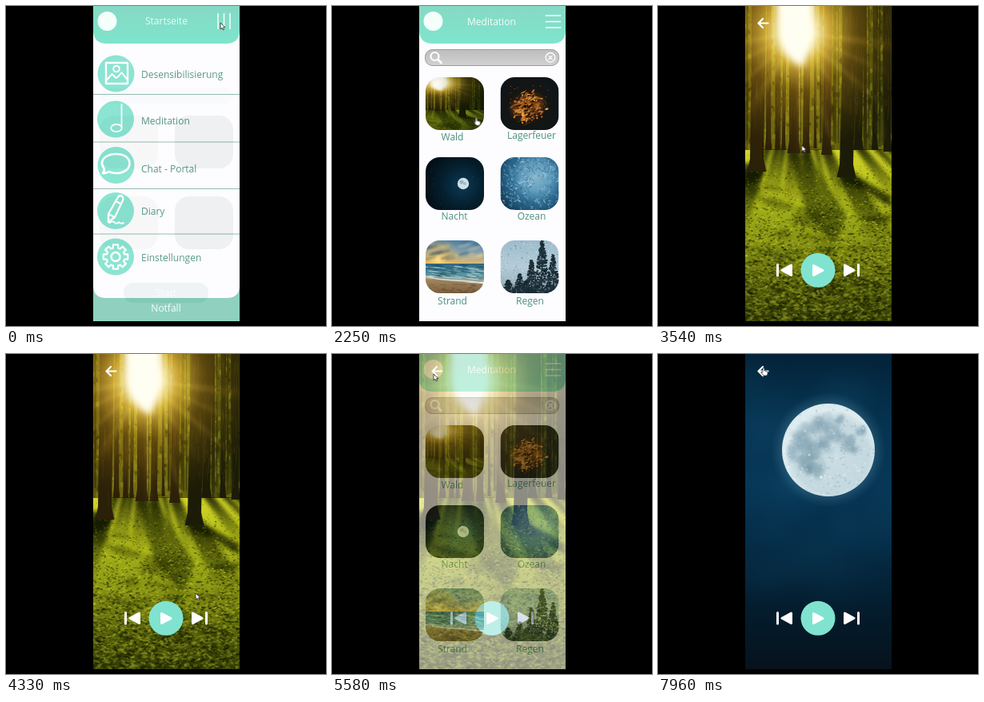
Write an HTML page with a canvas that moves like this. It is 400 by 400 pixels and loops after 8 s.

```html
<!DOCTYPE html>
<html lang="de">
<head>
<meta charset="utf-8">
<title>App-Prototyp</title>
<style>
html, body { margin: 0; width: 100%; height: 100%; overflow: hidden; background: #000; }
#stage { position: relative; width: 400px; height: 400px; overflow: hidden; background: #000; }
.screen { position: absolute; left: 109px; top: 0; width: 183px; height: 394px; overflow: hidden; }
.screen > * { position: absolute; left: 0; top: 0; }
svg { display: block; }
text { font: 12px "Open Sans", "Noto Sans", sans-serif; fill: #4c9080; }
.head { fill: #f2fffb; }
.mid { text-anchor: middle; }
.line { fill: none; stroke: #fff; stroke-linecap: round; stroke-linejoin: round; }
.screen, #cursor, #cursor g { animation: 8s linear infinite; }
#menu { animation: none; }
#start { animation-name: start; }
#paper { background: #fdfcfe; animation-name: paper; }
#list { animation-name: list; }
#forest { animation-name: forest; }
#moon, #controls { animation-name: moon; }
#cursor { position: absolute; left: 0; top: 0; animation-name: move; animation-timing-function: ease-in-out; }
#cursor .arrow { animation-name: arrow; animation-timing-function: step-end; }
#cursor .hand { animation-name: hand; animation-timing-function: step-end; }
@keyframes start { 0% { opacity: .08 } 1%, 100% { opacity: 0 } }
@keyframes paper { 0%, 23.125% { opacity: 0 } 27.5%, 100% { opacity: 1 } }
@keyframes list { 0%, 23.125% { opacity: 0 } 27.5%, 83.375% { opacity: 1 } 87.5%, 100% { opacity: 0 } }
@keyframes forest { 0%, 38.75% { opacity: 0 } 43.125%, 67.5% { opacity: 1 } 72%, 100% { opacity: 0 } }
@keyframes moon { 0%, 83.375% { opacity: 0 } 87.5%, 100% { opacity: 1 } }
@keyframes move {
  0%, 2% { transform: translate(268px, 21px) }
  14.5%, 15.5% { transform: translate(195px, 213px) }
  20%, 24% { transform: translate(200px, 143px) }
  32%, 40% { transform: translate(163px, 138px) }
  53%, 55% { transform: translate(237px, 299px) }
  65%, 70.5% { transform: translate(127px, 25px) }
  80%, 87.5% { transform: translate(154px, 228px) }
  97%, 100% { transform: translate(132px, 18px) }
}
@keyframes arrow { 0% { opacity: 1 } 19% { opacity: 0 } 42% { opacity: 1 } 64% { opacity: 0 } 68.5% { opacity: 1 } 79.5% { opacity: 0 } 83.5% { opacity: 1 } 96.5%, 100% { opacity: 0 } }
@keyframes hand { 0% { opacity: 0 } 19% { opacity: 1 } 42% { opacity: 0 } 64% { opacity: 1 } 68.5% { opacity: 0 } 79.5% { opacity: 1 } 83.5% { opacity: 0 } 96.5%, 100% { opacity: 1 } }
</style>
</head>
<body>
<div id="stage">
  <svg width="0" height="0" style="position:absolute">
    <defs>
      <linearGradient id="mint" x2="0" y2="1">
        <stop stop-color="#86d9c4"/><stop offset="1" stop-color="#7ee5cd"/>
      </linearGradient>
      <linearGradient id="grey" x2="0" y2="1">
        <stop stop-color="#bdbdbd"/><stop offset="1" stop-color="#d2d2d2"/>
      </linearGradient>
      <g id="top">
        <path d="M109 0H292V30Q292 47 275 47H126Q109 47 109 30Z" fill="url(#mint)"/>
        <circle cx="126.5" cy="19" r="12" fill="#f4fffc"/>
      </g>
      <g id="player">
        <path class="line" d="M137.5 21.5H126M131 16l-5.5 5.5 5.5 5.5" stroke-width="2.2"/>
        <circle cx="200" cy="330.3" r="21.5" fill="#80e3d0"/>
        <g class="line" style="fill:#fff" stroke-width="3">
          <path d="M194.5 324.5v12l11.5-6z"/>
          <path d="M166.5 324v12.5l-11.5-6.2zM149.5 323.5v13.5"/>
          <path d="M233.5 324v12.5l11.5-6.2zM250.5 323.5v13.5"/>
        </g>
      </g>
    </defs>
  </svg>

  <div class="screen" id="menu">
    <svg width="183" height="394" viewBox="109 0 183 394">
      <rect x="109" width="183" height="394" fill="#86cdb9"/>
      <path d="M109 20H292V349Q292 365 276 365H125Q109 365 109 349Z" fill="#fdfcfe"/>
      <use href="#top"/>
      <text class="head" x="174" y="23">Startseite</text>
      <path class="line" d="M265 9.5V28.5M272.5 9.5V28.5M280 9.5V28.5" stroke-width="1.6"/>
      <path d="M109 110.5H292M109 170H292M109 228.5H292M109 285H292" stroke="#8fb8ac"/>
      <g fill="#82e2cf">
        <circle cx="137.5" cy="84.5" r="23"/><circle cx="137" cy="141.5" r="23"/>
        <circle cx="137.5" cy="199" r="23"/><circle cx="137" cy="256" r="23"/>
        <circle cx="137" cy="313.5" r="23"/>
      </g>
      <g class="line" stroke-width="2.4">
        <rect x="125" y="71" width="27" height="26"/>
        <circle cx="138" cy="78.5" r="3.8" stroke-width="2"/>
        <path d="M125.5 93l7-8 5 5 3-2 4-5 7 9" stroke-width="2"/>
        <path d="M144.5 123V152" stroke-width="1.8"/>
        <ellipse cx="138" cy="152.5" rx="6.8" ry="4.5" stroke-width="1.8"/>
        <path d="M122.5 203C115 192 126 185 138 185C148 185 154.5 190 154.5 197C154.5 204 147 209 138 209C134 209 131 208.3 128.5 207Q125 209.5 121 209Q123.5 206.5 122.5 203Z" stroke-width="2.7"/>
        <path d="M140 239q3-4 6 0q1 2 0 4l-10 21l-8 6l0-10zM137 244l7 3.5M128 260l8 4"/>
        <path d="M129 271q6-3 7 0q3 2 5-1q2 3 6 1" stroke-width="2"/>
        <path id="gear" stroke-width="2.3"/>
        <circle cx="137" cy="313.5" r="5.5"/>
      </g>
      <text x="169" y="89.5">Desensibilisierung</text>
      <text x="169" y="148">Meditation</text>
      <text x="169" y="207.5">Chat - Portal</text>
      <text x="169" y="261">Diary</text>
      <text x="169" y="318.5">Einstellungen</text>
      <text class="head mid" x="200" y="381.5">Notfall</text>
    </svg>
  </div>

  <div class="screen" id="start">
    <svg width="183" height="394" viewBox="109 0 183 394">
      <rect x="109" width="183" height="394" fill="#fff"/>
      <use href="#top"/>
      <rect x="117" y="103" width="167" height="19" rx="9" fill="#cfeee6"/>
      <g fill="#537264">
        <rect x="117" y="137" width="73" height="66" rx="18" opacity=".4"/>
        <rect x="211" y="137" width="73" height="66" rx="18"/>
        <rect x="117" y="238" width="73" height="66" rx="18" opacity=".4"/>
        <rect x="211" y="238" width="73" height="66" rx="18"/>
      </g>
      <rect x="147" y="346" width="106" height="25" rx="12" fill="#52a08e"/>
      <text class="head mid" x="200" y="363">Start</text>
    </svg>
  </div>

  <div class="screen" id="paper"></div>
  <div class="screen" id="moon"><canvas width="183" height="394"></canvas></div>

  <div class="screen" id="list">
    <canvas width="183" height="394"></canvas>
    <svg width="183" height="394" viewBox="109 0 183 394">
      <use href="#top"/>
      <text class="head" x="169" y="24">Meditation</text>
      <path class="line" d="M267.5 12H285.5M267.5 19.5H285.5M267.5 27H285.5" stroke-width="1.7"/>
      <rect x="116.5" y="54.5" width="167" height="20" rx="9" fill="url(#grey)" stroke="#9b9b9b"/>
      <g class="line">
        <circle cx="128.5" cy="63" r="5" stroke-width="2.2"/>
        <path d="M132.5 67l4 4" stroke-width="2.8"/>
        <circle cx="273" cy="64.3" r="5.8" stroke-width="1.3"/>
        <path d="M270.8 62.1l4.4 4.4M275.2 62.1l-4.4 4.4" stroke-width="1.3"/>
      </g>
      <g class="mid">
        <text x="150.5" y="168">Wald</text><text x="249.5" y="166">Lagerfeuer</text>
        <text x="153" y="267">Nacht</text><text x="249.5" y="267">Ozean</text>
        <text x="150.5" y="373">Strand</text><text x="247.5" y="373">Regen</text>
      </g>
    </svg>
  </div>

  <div class="screen" id="forest">
    <canvas width="183" height="394"></canvas>
    <svg width="183" height="394" viewBox="109 0 183 394"><use href="#player"/></svg>
  </div>

  <div class="screen" id="controls">
    <svg width="183" height="394" viewBox="109 0 183 394"><use href="#player"/></svg>
  </div>

  <svg id="cursor" width="14" height="14" style="overflow:visible">
    <g class="arrow"><path d="M0 0V8L2 6.3 3.3 9 4.6 8.4 3.4 5.8H6Z" fill="#fff" stroke="#222" stroke-width=".8"/></g>
    <g class="hand"><path d="M-1 0q1-1.5 2 0v3l4 1v3l-1 2h-4l-3-4 2-.5z" fill="#fff" stroke="#333" stroke-width=".7"/></g>
  </svg>
</div>

<script>
const W = 183, H = 394, TAU = Math.PI * 2;
let seed = 7;
const rnd = (a = 0, b = 1) => {
  seed = (seed * 1664525 + 1013904223) % 4294967296;
  return a + (b - a) * seed / 4294967296;
};
const pick = list => list[Math.floor(rnd(0, list.length))];
const context = id => document.querySelector(`#${id} canvas`).getContext('2d');
const repeat = (n, fn) => { for (let i = 0; i < n; i++) fn(i); };

function addStops(g, colors) {
  colors.forEach((c, i) => Array.isArray(c) ? g.addColorStop(c[0], c[1]) : g.addColorStop(i / (colors.length - 1), c));
  return g;
}
const vertical = (c, y0, y1, ...colors) => addStops(c.createLinearGradient(0, y0, 0, y1), colors);
const horizontal = (c, x0, x1, ...colors) => addStops(c.createLinearGradient(x0, 0, x1, 0), colors);
const radial = (c, x, y, r, ...colors) => addStops(c.createRadialGradient(x, y, 0, x, y, r), colors);

function box(c, fill, x, y, w, h) { c.fillStyle = fill; c.fillRect(x, y, w, h); }
function blob(c, fill, x, y, rx, ry = rx, turn = 0) {
  c.fillStyle = fill;
  c.beginPath();
  c.ellipse(x, y, rx, ry, turn, 0, TAU);
  c.fill();
}
function poly(c, fill, ...p) {
  c.fillStyle = fill;
  c.beginPath();
  for (let i = 0; i < p.length; i += 2) c.lineTo(p[i], p[i + 1]);
  c.fill();
}
function blurred(c, px, draw) {
  c.filter = `blur(${px}px)`;
  draw();
  c.filter = 'none';
}

function drawForest(c) {
  const sx = 66, sy = 32, ground = 182;
  // left, width, bottom, lean
  const trunks = [[26, 6, 180, 1], [38, 5, 180, 0], [46, 4, 180, 2], [55, 12, 184, 0], [72, 8, 184, 2],
    [86, 3, 178, 0], [97, 10, 186, 2], [137, 9, 180, 3], [159, 6, 180, 1], [174, 8, 182, 0],
    [6, 17, 207, 3], [118, 17, 214, 5]];

  box(c, horizontal(c, 0, W, '#4a4209', '#6c6410', '#4d500c', '#2a330a'), 0, 0, W, ground);
  repeat(900, () => blob(c, pick(['rgba(150,150,28,.4)', 'rgba(14,20,3,.5)', 'rgba(95,115,18,.4)']),
    rnd(0, W), rnd(0, 178), rnd(.8, 2.5), rnd(1, 5)));
  repeat(34, () => box(c, 'rgba(28,24,5,.75)', rnd(0, W), 0, rnd(1, 3), rnd(165, 183)));
  box(c, vertical(c, 110, ground, 'rgba(150,140,20,0)', 'rgba(150,140,20,.28)'), 0, 110, W, ground - 110);

  box(c, vertical(c, ground, H, '#d2d427', [.15, '#bcc41c'], [.4, '#98a416'], [.7, '#75800f'], [1, '#434d08']), 0, ground - 2, W, H);
  c.save();
  c.beginPath();
  c.rect(0, ground - 3, W, H);
  c.clip();
  blurred(c, 2.5, () => {
    for (const [x, w, y] of trunks) {
      const reach = y > 200 ? 90 : 60, slope = (x + w / 2 - sx) / (y - sy);
      const end = x + slope * reach * 1.6;
      poly(c, vertical(c, y, y + reach, 'rgba(18,24,0,.85)', 'rgba(22,28,0,0)'),
        x - 2, y - 5, x + w + 2, y - 5, end + w * 1.9, y + reach, end - w * .4, y + reach);
    }
    poly(c, 'rgba(16,22,0,.75)', 114, 213, 140, 213, 183, 238, 183, 252, 146, 229);
    poly(c, 'rgba(16,22,0,.8)', -5, 196, 24, 200, 14, 220, -5, 228);
    poly(c, 'rgba(25,32,0,.5)', 56, 185, 80, 185, 126, 262, 112, 300, 78, 262);
    repeat(26, () => blob(c, 'rgba(22,28,0,.35)', rnd(0, W), rnd(215, H), rnd(10, 28), rnd(2, 6), rnd(-.2, .3)));
  });
  repeat(4200, () => {
    const d = Math.pow(rnd(), .8), s = .5 + d * 1.5;
    blob(c, pick(['rgba(18,25,0,.5)', 'rgba(30,38,0,.45)', 'rgba(215,222,55,.4)', 'rgba(165,180,30,.4)']),
      rnd(0, W), ground + d * (H - ground), s * rnd(.7, 2), s * rnd(.35, .8), rnd(-.6, .6));
  });
  c.restore();

  for (const [x, w, y, lean] of trunks) {
    const tone = x > 110 ? '#1c1b08' : '#2b2008';
    blurred(c, .6, () => poly(c, tone, x + lean, -2, x + lean + w, -2, x + w, y - 16, x + w * 1.2, y, x - w * .2, y, x, y - 16));
    repeat(14, () => box(c, 'rgba(95,75,22,.25)', rnd(x + 1, x + w - 1), rnd(0, y - 30), 1, rnd(8, 24)));
  }

  c.globalCompositeOperation = 'screen';
  blurred(c, 2, () => repeat(11, i => {
    const a = .15 + i * .28, w = rnd(.02, .06), r = rnd(120, 200);
    poly(c, radial(c, sx, sy, r, 'rgba(255,205,90,.32)', 'rgba(190,130,10,0)'), sx, sy,
      sx + Math.cos(a - w) * r, sy + Math.sin(a - w) * r, sx + Math.cos(a + w) * r, sy + Math.sin(a + w) * r);
  }));
  box(c, radial(c, sx, sy, 150, '#fff', [.12, '#fff6cc'], [.27, 'rgba(240,190,60,.8)'], [.5, 'rgba(165,115,15,.42)'], [1, 'rgba(80,55,0,0)']), 0, 0, W, 200);
  c.globalCompositeOperation = 'source-over';
  blurred(c, 4, () => poly(c, '#fffef2', 38, -8, 86, -8, 82, 48, 72, 76, 60, 70, 46, 52));
  box(c, vertical(c, 290, H, 'rgba(20,25,0,0)', 'rgba(20,25,0,.3)'), 0, 290, W, H);
}

function drawMoon(c) {
  box(c, vertical(c, 0, H, '#032338', '#04304c', '#063655', '#052d48', '#041d2e', '#06121c'), 0, 0, W, H);
  repeat(30, () => {
    const x = rnd(0, W), y = rnd(20, 310), r = rnd(25, 60);
    blob(c, radial(c, x, y, r, 'rgba(20,80,115,.1)', 'rgba(20,80,115,0)'), x, y, r);
  });
  const x = 104, y = 120, r = 58;
  blob(c, radial(c, x, y, 72, 'rgba(120,175,200,.4)', [.78, 'rgba(120,175,200,.25)'], [1, 'rgba(80,140,170,0)']), x, y, 72);
  c.save();
  c.beginPath();
  c.arc(x, y, r, 0, TAU);
  c.clip();
  box(c, radial(c, x + 4, y + 8, r, '#cbdde3', [.8, '#c3d8df'], [1, '#dcebef']), 0, 0, W, 200);
  const seas = [[-31, -18, 15], [-38, 4, 14], [-22, 5, 14], [-8, -32, 13], [8, -21, 11], [23, -9, 10], [32, -1, 7],
    [-14, 24, 12], [-28, 22, 9], [40, -24, 6], [14, -39, 6], [-5, -8, 11]];
  blurred(c, 1.5, () => {
    for (const [dx, dy, s] of seas) repeat(12, () =>
      blob(c, 'rgba(110,148,164,.17)', x + dx + rnd(-.7, .7) * s, y + dy + rnd(-.7, .7) * s, s * rnd(.3, .7), s * rnd(.3, .7)));
  });
  repeat(420, () => blob(c, pick(['rgba(240,250,255,.25)', 'rgba(110,145,160,.2)']),
    x + rnd(-r, r), y + rnd(-r, r), rnd(.4, 1.7)));
  blob(c, 'rgba(255,255,255,.6)', x - 9, y + 34, 2);
  blob(c, 'rgba(255,255,255,.5)', x - 24, y + 6, 1.6);
  c.restore();
}

// Each picture is drawn in a 73 by 66 tile.
const scenes = {
  wood(c) {
    c.drawImage(document.querySelector('#forest canvas'), 30, 0, 153, 290, 0, 0, 73, 66);
    box(c, radial(c, 14, 9, 70, 'rgba(10,22,0,0)', 'rgba(10,22,0,.3)', 'rgba(10,22,0,.6)'), 0, 0, 73, 66);
  },
  fire(c) {
    box(c, radial(c, 36, 36, 45, '#2c1d10', '#151614', '#0d1519'), 0, 0, 73, 66);
    blurred(c, 3, () => blob(c, 'rgba(170,85,20,.55)', 34, 36, 20, 13, -.3));
    repeat(260, () => {
      const spread = rnd(2, 24), x = 34 + rnd(-1, 1) * spread;
      const y = 37 + rnd(-1, 1) * (24 - spread * .55);
      blob(c, pick(['#a55a1a', '#cf8230', '#e0a04a', '#6b3410', '#c4742a', '#1c130b', '#2a1a0c']),
        x, y, rnd(1, 4), rnd(.4, 1.3), rnd(-1.3, .4));
    });
    repeat(30, () => blob(c, '#b56d26', rnd(12, 60), rnd(8, 58), .5));
  },
  night(c) {
    box(c, radial(c, 46, 35, 50, '#0a3a55', '#05202f', '#030c14'), 0, 0, 73, 66);
    repeat(35, () => blob(c, 'rgba(140,180,200,.35)', rnd(0, 73), rnd(0, 66), .4));
    blob(c, '#cfe0e7', 47, 33, 7.2);
    blob(c, 'rgba(120,155,170,.6)', 45, 31, 2.6);
    blob(c, 'rgba(120,155,170,.5)', 49, 33, 2);
  },
  ocean(c) {
    box(c, radial(c, 44, 25, 52, '#86b6cd', [.35, '#5f9cbc'], [.6, '#2f6d94'], [1, '#123a58']), 0, 0, 73, 66);
    repeat(420, () => {
      const x = rnd(0, 73), y = rnd(0, 66), a = rnd(0, TAU), n = rnd(1, 5);
      c.strokeStyle = pick(['rgba(220,238,246,.5)', 'rgba(150,195,215,.45)', 'rgba(18,62,95,.4)', 'rgba(45,105,140,.45)']);
      c.lineWidth = rnd(.4, 1.2);
      c.beginPath();
      c.moveTo(x, y);
      c.quadraticCurveTo(x + rnd(-3, 3), y + rnd(-3, 3), x + n * Math.cos(a), y + n * Math.sin(a));
      c.stroke();
    });
  },
  beach(c) {
    box(c, vertical(c, 0, 29, '#4a7fa6', '#7f9fae', '#dcb873'), 0, 0, 73, 30);
    box(c, radial(c, 16, 25, 30, '#ffe08a', 'rgba(245,185,75,.5)', 'rgba(240,180,80,0)'), 0, 0, 73, 30);
    blurred(c, 1, () => {
      repeat(26, () => blob(c, pick(['rgba(60,85,105,.45)', 'rgba(235,205,150,.35)']), rnd(0, 73), rnd(2, 23), rnd(4, 10), rnd(1, 2.5), -.25));
    });
    box(c, vertical(c, 29, 52, '#2f6680', '#4d8c9b', '#9fb0a2'), 0, 29, 73, 23);
    poly(c, vertical(c, 46, 66, '#a78c62', '#7d6040'), 0, 46, 35, 51, 73, 54, 73, 66, 0, 66);
    repeat(60, () => blob(c, pick(['rgba(230,240,238,.5)', 'rgba(20,70,92,.45)']), rnd(0, 73), rnd(31, 48), rnd(3, 9), rnd(.4, 1), .1));
    c.strokeStyle = '#dcdfd6';
    c.lineWidth = 1.5;
    c.beginPath();
    c.moveTo(0, 45);
    c.bezierCurveTo(25, 53, 45, 47, 73, 54);
    c.stroke();
    repeat(60, () => blob(c, 'rgba(65,45,22,.3)', rnd(0, 73), rnd(54, 66), rnd(1, 4), .5));
  },
  rain(c) {
    box(c, vertical(c, 0, 66, '#9dbccd', '#b4ccd7', '#8fa8b2'), 0, 0, 73, 66);
    // tip, top, spread
    const trees = [[52, 1, 13], [39, 25, 8], [24, 42, 8], [66, 18, 10], [10, 50, 9], [32, 50, 7]];
    for (const [x, y, w] of trees) {
      box(c, '#1b2d36', x - .6, y, 1.2, 66 - y);
      repeat((66 - y) * 5, () => {
        const t = rnd(), s = .8 + t * w;
        blob(c, pick(['#1b2d36', '#263c46', '#14252d']), x + rnd(-s, s), y + t * (66 - y), rnd(.8, 2.2), rnd(.6, 1.3), rnd(-.5, .5));
      });
    }
    box(c, vertical(c, 54, 66, 'rgba(25,42,50,0)', 'rgba(25,42,50,.9)'), 0, 54, 73, 12);
    repeat(210, () => blob(c, pick(['rgba(235,245,250,.5)', 'rgba(60,90,105,.4)']), rnd(0, 73), rnd(0, 66), rnd(.3, .8), rnd(.4, 1.1)));
  }
};

function drawTiles(c) {
  Object.values(scenes).forEach((draw, i) => {
    c.save();
    c.translate(i % 2 ? 101.5 : 8, [89, 189, 293][i >> 1]);
    c.beginPath();
    c.roundRect(0, 0, 73, 66, 18);
    c.clip();
    draw(c);
    c.restore();
  });
}

function gearPath() {
  const points = [];
  repeat(8, i => [[-.27, 11.5], [-.2, 15.5], [.2, 15.5], [.27, 11.5]].forEach(([d, r]) => {
    const a = i * TAU / 8 + d;
    points.push(`${(137 + r * Math.cos(a)).toFixed(1)} ${(313.5 + r * Math.sin(a)).toFixed(1)}`);
  }));
  return `M${points.join('L')}Z`;
}

document.getElementById('gear').setAttribute('d', gearPath());
drawForest(context('forest'));
drawMoon(context('moon'));
drawTiles(context('list'));
</script>
</body>
</html>
```
